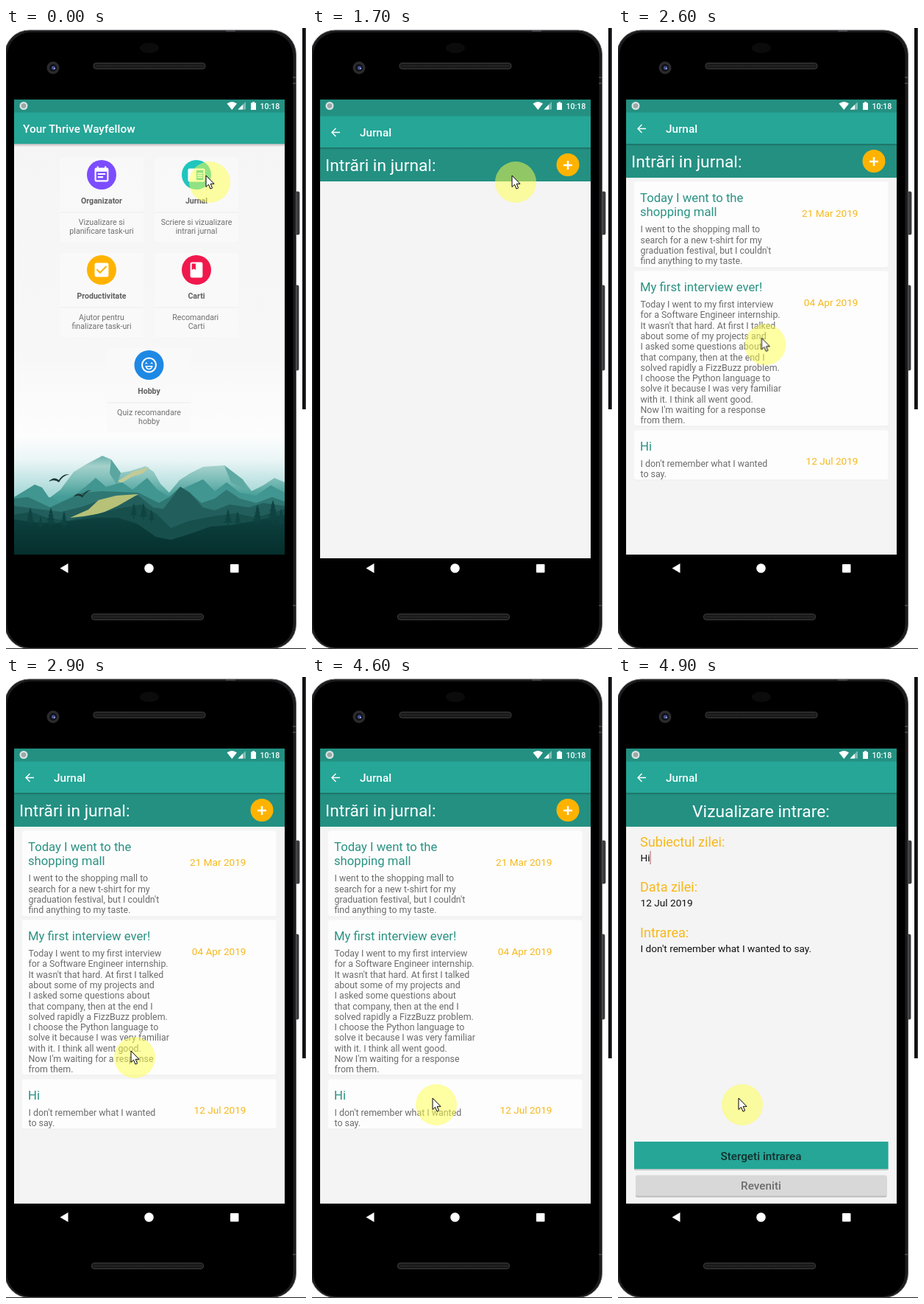
Write an HTML page that moves like this. It is 408 px wide and 842 px high and loops after 5 s.

```html
<!DOCTYPE html>
<html lang="ro">
<head>
<meta charset="utf-8">
<title>Journal app demo</title>
<style>
html, body { margin: 0; width: 100%; height: 100%; overflow: hidden; background: #fff; }
svg { display: block; width: 408px; height: 842px; font-family: Roboto, "Open Sans", sans-serif; }
.m { font-weight: 500; }
.b { font-weight: 700; }
.anim { animation: 5s step-end infinite; }
#press { animation-name: press; }
#wave { animation-name: wave; transform-origin: 262px 200px; }
#list { animation-name: list; }
#entries { animation-name: entries; }
#view { animation-name: view; }
#pointer { animation-name: pointer; }

@keyframes press { 0% { opacity: 0 } 18%, 100% { opacity: 1 } }
@keyframes wave {
  0%, 18% { transform: scale(.7); animation-timing-function: step-end }
  20% { transform: scale(1); animation-timing-function: steps(7) }
  34%, 100% { transform: scale(2.1) }
}
@keyframes list {
  0% { opacity: 0; transform: translateY(5px) }
  34% { opacity: 1; transform: translateY(5px) }
  36%, 100% { opacity: 1; transform: none }
}
@keyframes entries { 0% { opacity: 0 } 48%, 100% { opacity: 1 } }
@keyframes view {
  0% { opacity: 0; transform: translateY(25px) }
  94% { opacity: .5; transform: translateY(25px) }
  96% { opacity: 1; transform: translateY(5px) }
  98%, 100% { opacity: 1; transform: none }
}
@keyframes pointer {
  0% { transform: translate(277px, 209px) }
  36% { transform: translate(277px, 209px); animation-timing-function: steps(4) }
  44% { transform: translate(251px, 256px); animation-timing-function: steps(6) }
  56% { transform: translate(175px, 516px) }
  62% { transform: translate(175px, 516px); animation-timing-function: steps(4) }
  70%, 100% { transform: translate(169px, 580px) }
}
</style>
</head>
<body>
<svg viewBox="0 0 408 842">
  <defs>
    <linearGradient id="sky" x1="0" y1="0" x2="0" y2="1">
      <stop offset="0" stop-color="#f5f5f5"/><stop offset=".5" stop-color="#f7f7f7"/>
      <stop offset=".71" stop-color="#fdfdfd"/><stop offset=".77" stop-color="#eaf5f6"/>
      <stop offset=".85" stop-color="#a9d9d8"/>
    </linearGradient>
    <linearGradient id="far" gradientUnits="userSpaceOnUse" x1="0" y1="578" x2="0" y2="650">
      <stop offset="0" stop-color="#64aea8"/><stop offset=".22" stop-color="#a4d0cb"/>
      <stop offset=".42" stop-color="#86c2bd"/><stop offset=".8" stop-color="#459d97"/>
    </linearGradient>
    <linearGradient id="front" gradientUnits="userSpaceOnUse" x1="0" y1="650" x2="0" y2="714">
      <stop offset="0" stop-color="#0f4543"/><stop offset="1" stop-color="#052f2d"/>
    </linearGradient>
    <linearGradient id="shade" x1="0" y1="0" x2="0" y2="1">
      <stop offset="0" stop-opacity=".26"/><stop offset="1" stop-opacity="0"/>
    </linearGradient>
    <clipPath id="screen"><rect x="11" y="97" width="368" height="660"/></clipPath>
    <clipPath id="tile"><rect x="202.500" y="176" width="114" height="114"/></clipPath>
  </defs>

  <!-- phone body -->
  <rect width="408" height="842" fill="#fff"/>
  <rect x="403" width="5" height="517" fill="#111114"/>
  <path d="M407.500 0V517" stroke="#4a4a4e"/>
  <g fill="#3c3c3f" stroke="#222" stroke-width=".7">
    <rect x="392" y="222" width="7" height="58" rx="1.500"/>
    <rect x="392" y="349" width="6" height="115" rx="1.500"/>
  </g>
  <path d="M0 841.500H408" stroke="#222"/>
  <rect x="-1.500" y="3" width="396" height="838.500" rx="33" fill="#1c1c1e" stroke="#59595b" stroke-width=".9"/>
  <rect x="1.500" y="6" width="389" height="834" rx="32"/>
  <path d="M390 67h4.500M390 75h4.500M390 783h4.500M299 4h13" stroke="#66666a"/>
  <g fill="#1b1b1b" stroke="#3c3c3c">
    <rect x="119" y="47.500" width="152" height="8" rx="3.500"/>
    <rect x="116.500" y="794.500" width="152" height="8" rx="3.500"/>
  </g>
  <g fill="none" stroke="#303030" stroke-dasharray="1.500 1.500"><path d="M122 51.500H268M120 798.500H266"/></g>
  <ellipse cx="195" cy="27" rx="13" ry="7" fill="#0b0b0b"/>
  <circle cx="64" cy="54" r="8.500" fill="#2b2b2d"/>
  <circle cx="64" cy="54" r="5" fill="#101018"/>
  <circle cx="64.500" cy="54" r="2.600" fill="#43508f"/>
  <circle cx="66" cy="55" r="1" fill="#a9b2e0"/>

  <g clip-path="url(#screen)">
    <g id="home">
      <rect x="11" y="157" width="368" height="557" fill="url(#sky)"/>
      <g id="land"></g>
      <g id="tiles"></g>
      <g clip-path="url(#tile)">
        <g id="press" class="anim">
          <rect x="202" y="176" width="115" height="115" fill="#102020" opacity=".06"/>
          <circle id="wave" class="anim" cx="262" cy="200" r="53" opacity=".055"/>
        </g>
      </g>
    </g>
    <g id="list" class="anim">
      <rect x="11" y="157" width="368" height="557" fill="#f4f4f4"/>
      <g class="head"></g>
      <g id="entries" class="anim"></g>
    </g>
    <g id="view" class="anim">
      <rect x="11" y="157" width="368" height="557" fill="#f4f4f4"/>
      <g class="head"></g>
      <g id="form"></g>
    </g>
  </g>

  <!-- system icons -->
  <g fill="#fff">
    <circle cx="24" cy="105.500" r="5.500" fill="#d9e4e2"/>
    <circle cx="24" cy="105.500" r="3.300" fill="#9aa8a6"/>
    <path d="M300.500 102.500Q307.300 97.500 314 102.500L307.300 111Z"/>
    <path d="M315.500 110.500L326 100V110.500Z" opacity=".4"/>
    <path d="M315.500 110.500L322 104V110.500Z"/>
    <path d="M333 101.500h2v-1.300h3v1.300h2v9.500h-7Z"/>
    <text class="m" x="345.500" y="109.500" font-size="10.600">10:18</text>
    <path d="M73.500 732.500L84.500 726V739Z"/>
    <circle cx="194.500" cy="732.500" r="6.300"/>
    <rect x="305" y="727" width="11.500" height="11.500" rx="1"/>
  </g>

  <g id="pointer" class="anim">
    <circle r="28" fill="#ffff48" opacity=".5"/>
    <path d="M-5 -9V6.500L-1.500 3.200L1 9L3.600 7.900L1.200 2.300H6Z" fill="#fff" stroke="#000" stroke-linejoin="round"/>
  </g>
</svg>
<script>
const $ = s => document.querySelector(s);
const text = (s, x, y, size, fill, cls = "", anchor = "start") =>
  `<text x="${x}" y="${y}" font-size="${size}" fill="${fill}" class="${cls}" text-anchor="${anchor}">${s}</text>`;
const rect = (x, y, w, h, fill, more = "") =>
  `<rect x="${x}" y="${y}" width="${w}" height="${h}" fill="${fill}" ${more}/>`;
const path = (d, fill, more = "") => `<path d="${d}" fill="${fill}" ${more}/>`;

const teal = "#25a697", deep = "#239082", amber = "#f6b81c", grey = "#6b6b6b";

const bar = shade => rect(11, 97, 368, 18, "#239082") + rect(11, 114.5, 368, 42.5, teal) +
  rect(11, 157, 368, shade, "url(#shade)");

// landscape
const hill = (pts, fill) => path(`M11 714L${pts}L379 714Z`, fill);
const tree = (x, y, h) => {
  let d = "";
  for (let i = 0; i < 4; i++) {
    const top = y - h + i * h * .2, w = h * (.1 + i * .06);
    d += `M${x} ${top}L${x + w} ${top + h * .32}H${x - w}Z`;
  }
  return path(d + `M${x - .7} ${y - 5}h1.4v8h-1.4Z`, "#0f4341");
};
const bird = (x, y, s) =>
  path(`M${x - 14 * s} ${y + 4 * s}Q${x - 7 * s} ${y - 4 * s} ${x} ${y + 2 * s}Q${x + 5 * s} ${y - 7 * s} ${x + 14 * s} ${y - 6 * s}Q${x + 5 * s} ${y - 4 * s} ${x} ${y + 5 * s}Q${x - 6 * s} ${y} ${x - 14 * s} ${y + 4 * s}Z`, "#1c3535");
$("#land").innerHTML =
  hill("11 636 58 638 74 626 92 602 110 591 131 580 143 585 156 603 168 601 190 594 201 602 210 618 222 630 236 613 250 604 268 595 297 593 304 602 322 612 334 628 350 620 365 610 379 616", "url(#far)") +
  path("M143 585L156 603L151 620L141 604Z", "#5ba6a0") +
  path("M152 614L174 601L195 595L186 604L170 609L157 617Z", "#c2cb98") +
  path("M297 593L322 612L330 628L306 616Z", "#5fa9a3") +
  hill("11 636 26 627 39 619 49 623 58 636 74 642 92 634 108 622 122 610 136 622 158 616 172 626 192 610 206 626 222 636 237 626 268 612 284 628 300 616 318 630 340 634 360 620 379 630", "#419691") +
  hill("11 638 30 636 60 650 86 638 104 630 130 628 180 630 208 644 222 636 237 622 250 630 266 644 284 638 300 626 318 638 340 644 362 636 379 642", "#2f7773") +
  hill("11 648 42 652 75 656 100 650 130 640 180 634 200 650 214 652 237 622 250 630 268 650 284 654 304 646 330 650 350 644 379 648", "#225f5c") +
  path("M87 664L112 653L126 640L150 634L180 632L166 640L152 648L130 658L106 662Z", "#b7c177") +
  hill("11 660 34 656 56 664 84 668 120 660 150 652 184 646 206 660 224 678 250 668 282 662 312 658 340 664 379 652", "#174f4d") +
  hill("11 666 36 670 64 672 90 668 122 664 152 664 178 672 204 690 224 694 250 686 278 676 306 674 340 668 379 660", "url(#front)") +
  [[33, 672, 22], [61, 674, 24], [79, 675, 20], [47, 676, 14], [174, 662, 18], [187, 664, 20], [198, 668, 15],
   [302, 672, 20], [315, 672, 17], [342, 670, 24], [363, 670, 30], [374, 674, 22]].map(t => tree(...t)).join("") +
  bird(72, 611, 1) + bird(104, 632, .88);

// home tiles
const icons = {
  note: "M17 10H7v2h10zM19 3h-1V1h-2v2H8V1H6v2H5Q3 3 3 5V19Q3 21 5 21H19Q21 21 21 19V5Q21 3 19 3zM19 19H5V8H19zM14 14H7v2h7z",
  reader: "M13 12h7v1.500h-7zM13 9.500h7V11h-7zM13 14.500h7V16h-7zM21 4H3Q1 4 1 6V19Q1 21 3 21H21Q23 21 23 19V6Q23 4 21 4zM21 19H12V6H21z",
  check: "M19 3H5Q3 3 3 5V19Q3 21 5 21H19Q21 21 21 19V5Q21 3 19 3zM10 17L5 12L6.400 10.600L10 14.200L17.600 6.600L19 8z",
  book: "M18 2H6Q4 2 4 4V20Q4 22 6 22H18Q20 22 20 20V4Q20 2 18 2zM6 4h5v8l-2.500 -1.500L6 12z",
  smile: "M12 2A10 10 0 1 0 12 22A10 10 0 1 0 12 2zM12 4A8 8 0 1 1 12 20A8 8 0 1 1 12 4zM7 13H17Q16 18 12 18Q8 18 7 13zM9 14.300H15Q14 16.500 12 16.500Q10 16.500 9 14.300zM6.500 11L8.500 8L10.500 11L8.500 10zM13.500 11L15.500 8L17.500 11L15.500 10z"
};
const tile = (cx, y, icon, color, name, a, b) =>
  rect(cx - 57, y, 114, 114, "#fafafa", 'opacity=".75"') +
  `<circle cx="${cx}" cy="${y + 23}" r="20" fill="${color}"/>` +
  path(icons[icon], "#fff", `fill-rule="evenodd" transform="translate(${cx - 12.6} ${y + 10.4}) scale(1.05)"`) +
  rect(cx - 57, y + 73.5, 114, 1, "#eeeeee") +
  text(name, cx, y + 62, 10.6, "#606060", "b", "middle") +
  text(a, cx, y + 91, 10.7, "#707070", "", "middle") +
  text(b, cx, y + 103.3, 10.7, "#707070", "", "middle");
$("#tiles").innerHTML = bar(4) +
  text("Your Thrive Wayfellow", 23, 142, 15.4, "#fff", "m") +
  tile(130, 176, "note", "#7c4dff", "Organizator", "Vizualizare si", "planificare task-uri") +
  tile(259, 176, "reader", "#20c5bd", "Jurnal", "Scriere si vizualizare", "intrari jurnal") +
  tile(130, 305, "check", "#ffb300", "Productivitate", "Ajutor pentru", "finalizare task-uri") +
  tile(259, 305, "book", "#f0184c", "Carti", "Recomandari&nbsp;", "Carti") +
  tile(194.5, 434, "smile", "#1e88e5", "Hobby", "Quiz recomandare", "hobby");

// journal pages
const heads = document.querySelectorAll(".head");
heads.forEach(h => h.innerHTML = rect(11, 157, 368, 46, deep) + bar(3) +
  path("M38 136.500H27.500M32.500 131L27 136.500L32.500 142", "none", 'stroke="#fff" stroke-width="1.400"') +
  text("Jurnal", 65, 142, 15.3, "#fff", "m"));
heads[0].innerHTML += text("Intrări in jurnal:", 18, 189, 22.8, "#fff") +
  '<circle cx="348" cy="180.500" r="15.500" fill="#ffb300"/>' +
  path("M342 181H354M348 175V187", "none", 'stroke="#fff" stroke-width="2.500"');
heads[1].innerHTML += text("Vizualizare intrare:", 194.5, 189.5, 22.8, "#fff", "", "middle");

const entry = (y, h, title, date, dateY, body) => {
  const lines = title.split("|"), start = y + 28 + (lines.length - 1) * 19.4 + 21.5;
  return rect(22, y + 1, 345.5, h, "#ececec", 'rx="3"') + rect(22, y, 345.5, h, "#fdfdfd", 'rx="3"') +
    lines.map((s, i) => text(s, 30, y + 27.5 + i * 19.4, 16.7, "#2a9283")).join("") +
    body.split("|").map((s, i) => text(s, 30.5, start + i * 14.3, 12.4, grey)).join("") +
    text(date, 326.5, dateY, 13.6, amber, "", "end");
};
$("#entries").innerHTML =
  entry(208.5, 116, "Today I went to the|shopping mall", "21 Mar 2019", 255.5,
    "I went to the shopping mall to|search for a new t-shirt for my|graduation festival, but I couldn't|find anything to my taste.") +
  entry(329.5, 210, "My first interview ever!", "04 Apr 2019", 376.5,
    "Today I went to my first interview|for a Software Engineer internship.|It wasn't that hard. At first I talked|about some of my projects and|I asked some questions about|that company, then at the end I|solved rapidly a FizzBuzz problem.|I choose the Python language to|solve it because I was very familiar|with it. I think all went good.|Now I'm waiting for a response|from them.") +
  entry(545.5, 67, "Hi", "12 Jul 2019", 592, "I don't remember what I wanted|to say.");

const field = (y, label, value) => text(label, 30, y, 18.1, amber) + text(value, 30.5, y + 20, 13.65, "#111");
$("#form").innerHTML =
  field(229.8, "Subiectul zilei:", "Hi") +
  field(291.2, "Data zilei:", "12 Jul 2019") +
  field(352.6, "Intrarea:", "I don't remember what I wanted to say.") +
  rect(43.3, 236, 1.5, 18, "#c98f95") +
  rect(22, 632, 345.5, 37, "#c4cccb", 'rx="1"') + rect(22, 630, 345.5, 37, teal) +
  text("Stergeti intrarea", 194.5, 655, 15.3, "#12302c", "m", "middle") +
  rect(24, 677.5, 341.5, 28, "#bdbdbd", 'rx="2"') + rect(24, 675.5, 341.5, 28, "#d8d8d8", 'rx="2"') +
  text("Reveniti", 194.5, 695, 15.3, "#6c6c6c", "m", "middle");
</script>
</body>
</html>
```
